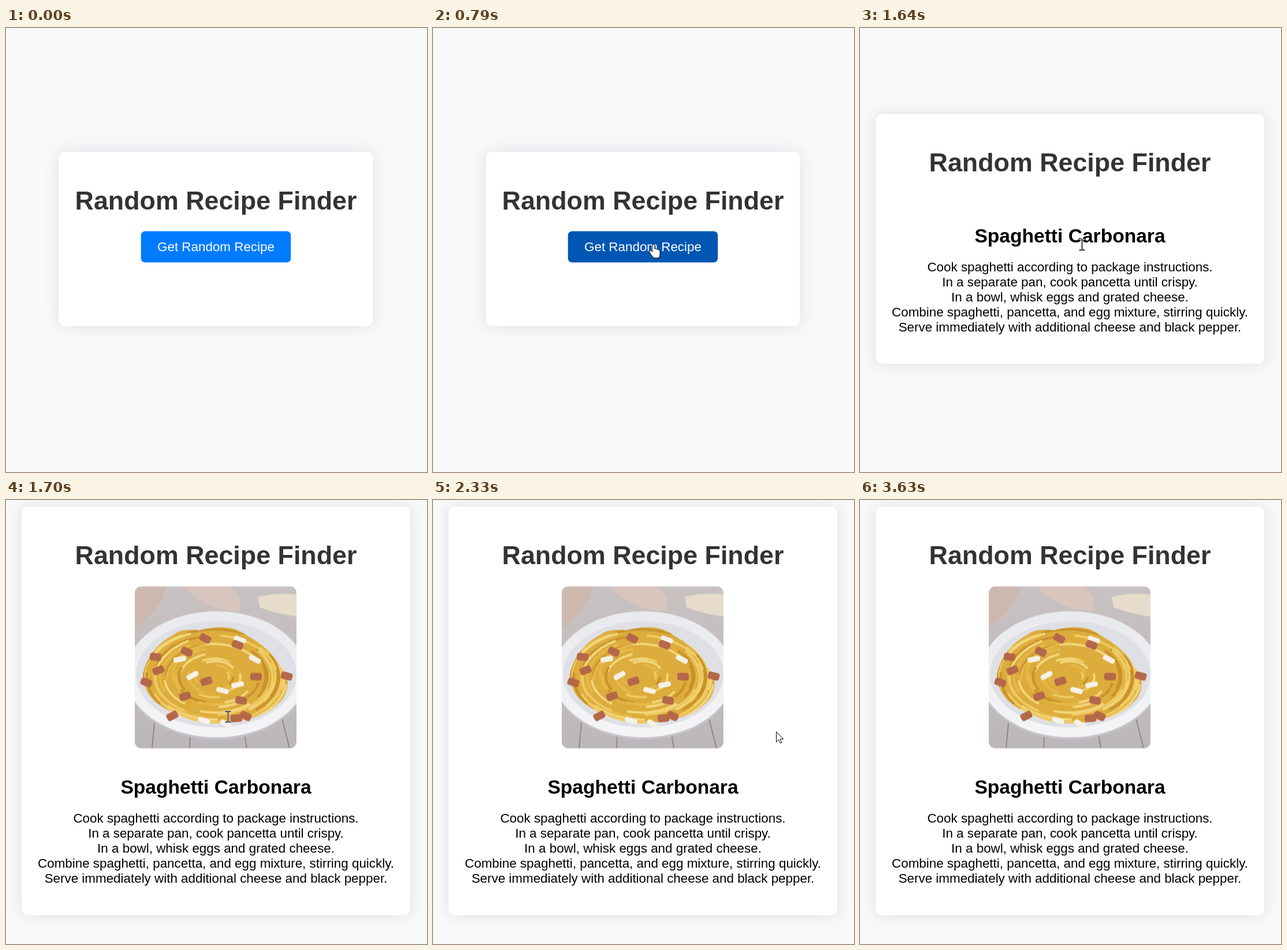
An HTML page that plays this animation: 729x768 px, repeating every 4.82 s.

```html
<!DOCTYPE html>
<html lang="en">
<head>
<meta charset="utf-8">
<title>Random Recipe Finder</title>
<style>
  html, body { margin: 0; width: 100%; height: 100%; overflow: hidden; background: #f7f9fb; }
  svg { display: block; width: 729px; height: 768px; }
  text { font: 22.4px "Liberation Sans", Arial, sans-serif; text-anchor: middle; }
  h1, .title { font-weight: bold; font-size: 44.8px; fill: #333; }
  .name { font-weight: bold; font-size: 33.6px; }

  .card { fill: #fff; rx: 11.2px; filter: drop-shadow(0 0 14px rgba(0, 0, 0, .1)); }
  .button { fill: #007bff; }
  .label { fill: #fff; }
  .beam { fill: none; stroke: #fff; stroke-width: 1.5; mix-blend-mode: difference; }
  .pointer path { fill: #fff; stroke: #000; stroke-width: 1; }

  .card, .title, .start, .button, .recipe, .photo, .pointer, .arrow, .hand, .beam, .click {
    animation: 4820ms step-end infinite;
  }
  .card { animation-name: card; }
  .title { animation-name: title; }
  .start { animation-name: start; }
  .button { animation-name: hover; }
  .recipe { animation-name: recipe; }
  .photo { animation-name: photo; }
  .pointer { animation-name: move; }
  .arrow { animation-name: arrow; }
  .hand { animation-name: hand; }
  .beam { animation-name: beam; }
  .click { animation-name: click; }

  @keyframes card {
    0% { x: 91.5px; y: 214px; width: 544px; height: 301.5px; }
    34.025% { x: 27px; y: 149px; width: 673px; height: 432px; }
    35.27%, 100% { x: 27px; y: 11.5px; width: 673px; height: 706.5px; }
  }
  @keyframes title {
    0% { transform: translateY(314px); }
    34.025% { transform: translateY(248px); }
    35.27%, 100% { transform: translateY(111px); }
  }
  @keyframes start {
    0% { visibility: visible; }
    34.025%, 100% { visibility: hidden; }
  }
  @keyframes hover {
    0% { fill: #007bff; }
    15.145%, 100% { fill: #0056b3; }
  }
  @keyframes recipe {
    0% { visibility: hidden; transform: translateY(-137px); }
    34.025% { visibility: visible; transform: translateY(-137px); }
    35.27%, 100% { visibility: visible; transform: none; }
  }
  @keyframes photo {
    0% { visibility: hidden; }
    35.27%, 100% { visibility: visible; }
  }
  @keyframes move {
    0% { transform: translate(631px, 557px); }
    6.017% { transform: translate(630px, 556px); }
    9.751% { transform: translate(594px, 533px); }
    10.996% { transform: translate(530px, 488px); }
    12.448% { transform: translate(464px, 443px); }
    13.693% { transform: translate(410px, 407px); }
    15.145% { transform: translate(388px, 383px); }
    16.39% { transform: translate(382px, 374px); }
    41.701% { transform: translate(396px, 375px); }
    42.946% { transform: translate(440px, 381px); }
    44.398% { transform: translate(500px, 389px); }
    45.643% { transform: translate(555px, 395px); }
    47.095% { transform: translate(584px, 399px); }
    48.34% { transform: translate(594px, 400px); }
    74.274%, 100% { transform: translate(698px, 477px); }
  }
  @keyframes arrow {
    0% { visibility: hidden; }
    4.564% { visibility: visible; }
    15.145% { visibility: hidden; }
    41.701% { visibility: visible; }
    75.311%, 100% { visibility: hidden; }
  }
  @keyframes hand {
    0% { visibility: hidden; }
    15.145% { visibility: visible; }
    34.025%, 100% { visibility: hidden; }
  }
  @keyframes beam {
    0% { visibility: hidden; }
    34.025% { visibility: visible; }
    41.701%, 100% { visibility: hidden; }
  }
  @keyframes click {
    0% { visibility: hidden; }
    30.29% { visibility: visible; }
    34.025%, 100% { visibility: hidden; }
  }
</style>
</head>
<body>
<svg viewBox="0 0 729 768">
  <defs>
    <clipPath id="frame"><rect width="280" height="280" rx="11.2"/></clipPath>
    <linearGradient id="wood" x2="0" y2="1">
      <stop offset="0" stop-color="#c9c2c2"/>
      <stop offset="1" stop-color="#bcb7ba"/>
    </linearGradient>
    <linearGradient id="plate" x2="0" y2="1">
      <stop offset="0" stop-color="#e9eaed"/>
      <stop offset="1" stop-color="#f5f5f7"/>
    </linearGradient>
    <path id="pasta" d="M14 152Q25 105 68 83Q80 72 112 76Q165 62 192 84Q238 108 252 140Q274 160 258 192Q232 226 180 232Q120 246 72 220Q16 200 14 152Z"/>
    <clipPath id="bowl"><use href="#pasta"/></clipPath>
  </defs>

  <rect width="729" height="768" fill="#f7f9fb"/>
  <rect class="card"/>
  <text class="title" x="363.5">Random Recipe Finder</text>

  <g class="start">
    <rect class="button" x="233.7" y="351.5" width="259.5" height="54" rx="7"/>
    <text class="label" x="363.5" y="386">Get Random Recipe</text>
  </g>

  <g class="photo">
    <g transform="translate(223 149.5)" clip-path="url(#frame)">
      <rect width="280" height="280" fill="url(#wood)"/>
      <path d="M34 236L30 280M96 255L95 280M190 255L194 280M254 225L268 280" stroke="#8f898c" stroke-width="2"/>
      <path d="M0 0H54Q46 40 0 72Z" fill="#cdb8b0"/>
      <path d="M82 0H165Q190 22 180 43Q128 44 82 0Z" fill="#d8c5bd"/>
      <path d="M213 18Q245 10 280 14V52Q240 46 216 36Z" fill="#e7dccb"/>
      <ellipse cx="141" cy="157" rx="156" ry="108" fill="#c4c3c8"/>
      <ellipse cx="141" cy="152" rx="156" ry="109" fill="url(#plate)"/>
      <ellipse cx="141" cy="152" rx="139" ry="92" fill="#dfe0e5"/>
      <use href="#pasta" fill="#dcac3c"/>
      <g id="strands" clip-path="url(#bowl)" fill="none" stroke-width="4"/>
      <g id="cheese" fill="#f6f1e6"></g>
      <g id="bacon" fill="#b5674a"></g>
    </g>
  </g>

  <g class="recipe">
    <text class="name" x="363.5" y="508">Spaghetti Carbonara</text>
    <text x="363.5" y="558">Cook spaghetti according to package instructions.</text>
    <text x="363.5" y="584">In a separate pan, cook pancetta until crispy.</text>
    <text x="363.5" y="610">In a bowl, whisk eggs and grated cheese.</text>
    <text x="363.5" y="636">Combine spaghetti, pancetta, and egg mixture, stirring quickly.</text>
    <text x="363.5" y="662">Serve immediately with additional cheese and black pepper.</text>
  </g>

  <g class="pointer">
    <path class="arrow" d="M.5 .8V18.5l4.1-3.9 2.6 6 2.7-1.2-2.6-5.9h5.5z"/>
    <path class="hand" d="M-2 2a2 2 0 0 1 4 0v6q2-1 3.3.8q2-.8 3.2 1q2.5-.4 2.5 2v6q0 3-2 6h-9q-2-3-5-6.5l-2.5-4.5q-.6-2.5 2-2l3.5 2z"/>
  </g>
  <path class="beam" transform="translate(384.5 375)" d="M-5-9.2h3.5L0-8.2l1.5-1H5M0-8V8M-5 9.2h3.5L0 8.2l1.5 1H5"/>
  <circle class="click" cx="382" cy="374" r="14" fill="#ff0" fill-opacity=".5"/>
</svg>
<script>
  let seed = 7;
  const rand = () => (seed = seed * 16807 % 2147483647) / 2147483647;

  function add(id, tag, attrs) {
    const el = document.createElementNS('http://www.w3.org/2000/svg', tag);
    for (const key in attrs) el.setAttribute(key, attrs[key]);
    document.getElementById(id).append(el);
  }

  // Curved strands wind around the middle of the plate.
  const tones = ['#efcb62', '#e5b947', '#c8922b', '#f3d67c'];
  for (let i = 0; i < 70; i++) {
    const r = 25 + 105 * rand(), a = 6.28 * rand(), b = a + .5 + rand();
    const at = t => `${(138 + r * Math.cos(t)).toFixed(1)} ${(156 + r * .67 * Math.sin(t)).toFixed(1)}`;
    add('strands', 'path', {
      d: `M${at(a)}A${r} ${r * .67} ${(rand() * 20 - 10).toFixed(1)} 0 1 ${at(b)}`,
      stroke: tones[i % 4]
    });
  }

  const bits = (id, w, h, spots) => spots.forEach(([x, y]) => add(id, 'rect', {
    x: x - w / 2, y: y - h / 2, width: w, height: h, rx: 4,
    transform: `rotate(${(rand() * 70 - 35).toFixed(1)} ${x} ${y})`
  }));
  bits('cheese', 22, 9, [[78, 126], [100, 154], [178, 170], [208, 126], [152, 180], [120, 232], [158, 238], [182, 92]]);
  bits('bacon', 20, 13, [[41, 145], [87, 190], [20, 166], [65, 224], [122, 90], [178, 101], [184, 197],
    [263, 155], [210, 156], [176, 228], [192, 224], [36, 122], [90, 113], [124, 164]]);
</script>
</body>
</html>
```
